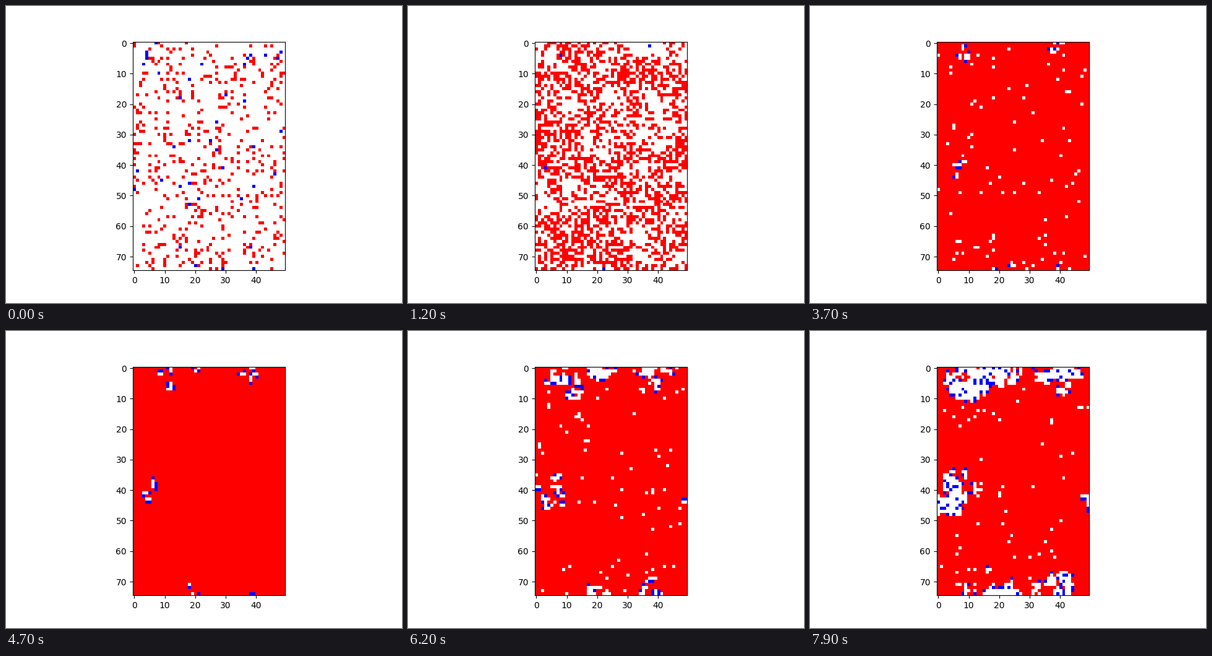
A matplotlib script that plays this animation: 640 px wide and 480 px high, repeating every 8000 ms.

```python
import random

import matplotlib.pyplot as plt
import numpy as np
from matplotlib.animation import FuncAnimation
from matplotlib.colors import ListedColormap

ROWS, COLS = 75, 50
STEPS, INTERVAL = 80, 100
EMPTY, SHARK, FISH = 0, 1, 2

START_FISH = 460
STARVING = 36          # sharks that die before the packs form
FISH_BREED = 9         # steps between spawning seasons
SHARK_BREED = 15
SETTLED = 12           # only the pack founders are alive from here on
CROWDED = 20           # the sea is full from here on
HOLES_LEFT = 150
LEAK = 14              # gaps drifting out of the packs per step
APPETITE = 0.75

# start, meeting point, later home of the pack (column, row), first birth
FOUNDERS = [((7, 0), (8, 4), (11, 4), 16),
            ((39, 74), (37, 1), (38, 74.5), 16),
            ((1, 42), (3, 41), (4, 41), 16),
            ((20, 73), (22, 74), (22, 73), 23)]


def neighbours(cell):
    r, c = cell
    return [((r - 1) % ROWS, c), ((r + 1) % ROWS, c),
            (r, (c - 1) % COLS), (r, (c + 1) % COLS)]


def distance(cell, home):
    """Distance on the torus; home is (column, row)."""
    dr = abs(cell[0] - home[1]) % ROWS
    dc = abs(cell[1] - home[0]) % COLS
    return np.hypot(min(dr, ROWS - dr), min(dc, COLS - dc))


class Shark:
    def __init__(self, cell, meet=None, home=None, due=STEPS, death=STEPS,
                 roam=1.0):
        self.cell, self.meet, self.home = cell, meet, home
        self.due, self.death, self.roam = due, death, roam

    def options(self, sea, t):
        free = [n for n in neighbours(self.cell) if sea[n] != SHARK]
        if self.home is None or not free:
            return free
        if t <= SETTLED:
            home, reach = self.meet, (SETTLED - t) / 1.5
        else:
            home = self.home
            reach = self.roam * (3 + 0.075 * (t - SETTLED))
        near = [n for n in free if distance(n, home) <= reach]
        if not near and distance(self.cell, home) > reach:
            near = [min(free, key=lambda n: distance(n, home))]
        return near


class Sea:
    def __init__(self, seed):
        self.rng = random.Random(seed)
        self.grid = np.zeros((ROWS, COLS), int)
        self.sharks = [Shark((r, c), meet, home, due)
                       for (c, r), meet, home, due in FOUNDERS]
        for s in self.sharks:
            self.grid[s.cell] = SHARK
        for cell in self.rng.sample(self.cells(EMPTY), STARVING):
            self.grid[cell] = SHARK
            self.sharks.append(
                Shark(cell, death=self.rng.randint(3, SETTLED - 1)))
        for cell in self.rng.sample(self.cells(EMPTY), START_FISH):
            self.grid[cell] = FISH

    def cells(self, kind):
        return [(int(r), int(c)) for r, c in np.argwhere(self.grid == kind)]

    def swim(self, spawning):
        shoal = self.cells(FISH)
        self.rng.shuffle(shoal)
        for cell in shoal:
            free = [n for n in neighbours(cell) if self.grid[n] == EMPTY]
            if free:
                self.grid[self.rng.choice(free)] = FISH
                if not spawning:
                    self.grid[cell] = EMPTY

    def thin_holes(self, keep):
        holes = self.cells(EMPTY)
        self.rng.shuffle(holes)
        for cell in holes[keep:]:
            self.grid[cell] = FISH

    def hop(self, hole, spread):
        r = (hole[0] + round(self.rng.gauss(0, spread))) % ROWS
        c = (hole[1] + round(self.rng.gauss(0, spread))) % COLS
        if self.grid[r, c] == FISH:
            self.grid[r, c], self.grid[hole] = EMPTY, FISH

    def drift(self, spawning):
        """In a full sea it is the gaps that travel."""
        loose, edge = [], []
        for hole in self.cells(EMPTY):
            fish = sum(self.grid[n] == FISH for n in neighbours(hole))
            if fish == 4:
                loose.append(hole)
            elif fish:
                edge.append(hole)
        if spawning:
            for hole in loose + edge:
                self.grid[hole] = FISH
            return
        for hole in loose:
            self.hop(hole, 6)
        for hole in self.rng.sample(edge, min(LEAK, len(edge))):
            self.hop(hole, 14)

    def hunt(self, t):
        born = []
        self.rng.shuffle(self.sharks)
        for s in self.sharks:
            if t >= s.death:
                self.grid[s.cell] = EMPTY
                continue
            moves = s.options(self.grid, t)
            if not moves:
                continue
            prey = [n for n in moves if self.grid[n] == FISH]
            if prey and self.rng.random() < APPETITE:
                moves = prey
            old, s.cell = s.cell, self.rng.choice(moves)
            self.grid[s.cell] = SHARK
            if t >= s.due:
                s.due += SHARK_BREED
                born.append(Shark(old, s.meet, s.home, s.due,
                                  roam=self.rng.uniform(0.75, 1.3)))
                self.grid[old] = SHARK
            else:
                self.grid[old] = EMPTY
        self.sharks = [s for s in self.sharks if t < s.death] + born

    def step(self, t):
        spawning = t % FISH_BREED == 2
        if t <= CROWDED:
            self.swim(spawning)
            if t == CROWDED:
                self.thin_holes(HOLES_LEFT)
        else:
            self.drift(spawning)
        self.hunt(t)


def run(seed=7):
    sea = Sea(seed)
    history = [sea.grid.copy()]
    for t in range(1, STEPS):
        sea.step(t)
        history.append(sea.grid.copy())
    return history


history = run()
fig, ax = plt.subplots(figsize=(6.4, 4.8), dpi=100)
image = ax.imshow(history[0], cmap=ListedColormap(["white", "blue", "red"]),
                  vmin=EMPTY, vmax=FISH)


def update(i):
    image.set_data(history[i])
    return [image]


anim = FuncAnimation(fig, update, frames=STEPS, interval=INTERVAL,
                     repeat=True, repeat_delay=0)
plt.show()
```
